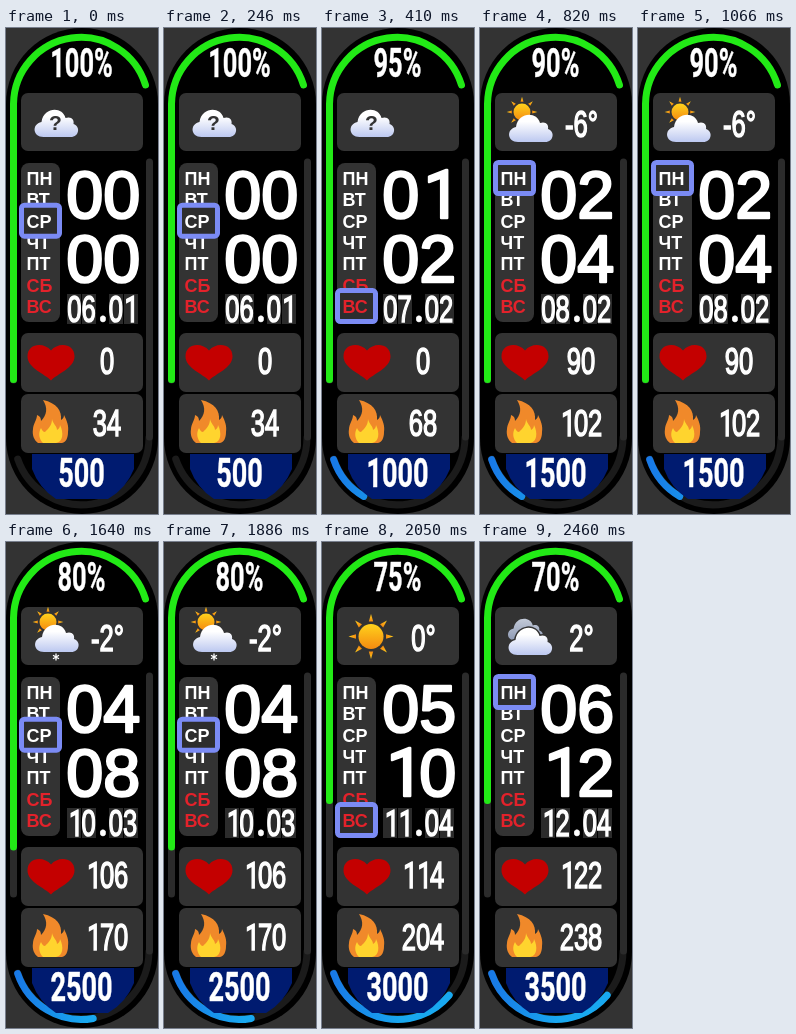
Write an HTML page that moves like this. It is 152 px wide and 486 px high and loops after 2870 ms.

```html
<!DOCTYPE html>
<html lang="ru">
<head>
<meta charset="utf-8">
<title>Watch face</title>
<style>
  html, body { margin: 0; width: 100%; height: 100%; overflow: hidden; background: #333; }
  svg { display: block; width: 152px; height: 486px; }
  text { fill: #fff; text-anchor: middle; }
  .panel { fill: #333; }
  .ring { fill: none; stroke-width: 7; stroke-linecap: round; }
  .din { font: bold 41px Roboto, sans-serif; stroke: #fff; stroke-width: .5; }
  .clock { font: 66.5px "Liberation Sans", sans-serif; stroke: #fff; stroke-width: 2.5; stroke-linejoin: round; }
  .value { font: 36.5px "Liberation Sans", sans-serif; stroke: #fff; stroke-width: 1.6; }
  .one { font-family: Roboto, sans-serif; }
  .day { font: bold 18px "Liberation Sans", sans-serif; text-anchor: start; }
  .weekend { fill: #e3222b; }
</style>
</head>
<body>
<svg viewBox="0 0 152 486">
  <defs>
    <linearGradient id="cloudFill" x2="0" y2="1">
      <stop offset=".25" stop-color="#fff"/><stop offset="1" stop-color="#bcc8f0"/>
    </linearGradient>
    <linearGradient id="greyFill" x2="0" y2="1">
      <stop stop-color="#c3cad8"/><stop offset="1" stop-color="#8d99b4"/>
    </linearGradient>
    <linearGradient id="sunFill" x2="0" y2="1">
      <stop stop-color="#ffd21c"/><stop offset="1" stop-color="#f58a10"/>
    </linearGradient>
    <linearGradient id="goalFill" gradientUnits="userSpaceOnUse" x1="10" x2="80">
      <stop stop-color="#1878e6"/><stop offset="1" stop-color="#18a8f0"/>
    </linearGradient>
    <path id="cloud" d="M9 27C-2 27-3 14 7 12C9-3 28-4 31 8C37 6 40 10 39 14C46 16 45 27 36 27Z"/>
    <g id="sun" fill="url(#sunFill)"><circle r="12.500"/></g>
  </defs>

  <rect width="152" height="486" rx="76"/>
  <path class="ring" stroke="#1b1b1b" d="M143 409.500A67.500 68 0 0 1 11.700 431"/>
  <path class="ring" stroke="#2b2b2b" d="M7.500 352V200M143.500 134V409"/>
  <path class="ring" id="battery" stroke="#22ea16"/>
  <path class="ring" id="goal" stroke="url(#goalFill)"/>

  <g class="panel">
    <rect x="15" y="65" width="122" height="58" rx="7"/>
    <rect x="15" y="135" width="39" height="159" rx="8"/>
    <rect x="15" y="305" width="122" height="59" rx="7"/>
    <rect x="15" y="366" width="122" height="59" rx="7"/>
  </g>
  <path fill="#001b70" d="M26 426H128V441A60 60 0 0 1 102 471H50A60 60 0 0 1 26 441Z"/>
  <path fill="#2b2b2b" d="M61 266h14v30h-14zM76 266h14v30h-14zM103 266h14v30h-14zM118 266h14v30h-14z"/>

  <path fill="#c40000" d="M45 352.500C39 346 21.500 340 21.500 328.500C21.500 315 38 314 45 322.500C52 314 68.500 315 68.500 328.500C68.500 340 51 346 45 352.500Z"/>
  <path fill="#f0892a" d="M37 372C51 375 56 383 55 392C57 391 58 389 58 387C61 393 63 398 62 404C62 410 60 414 56 415H32C28 412 26 407 27 401C27 396 31 392 31 387C34 388 35 390 35 393C41 387 42 380 37 372Z"/>
  <path fill="#ffd42e" d="M46 391C47 396 51 398 51 402C53 401 54 399 54 397C58 405 57 414 50 415H37C33 411 32 405 35 400C36 402 37 404 39 404C43 400 46 397 46 391Z"/>

  <g id="weather"></g>
  <g id="week"></g>
  <rect id="marker" x="15.500" width="38" height="31" rx="3" fill="#2d2d2d" stroke="#7b8bf4" stroke-width="5"/>
  <g id="today"></g>
  <g id="readouts"></g>
</svg>
<script>
const STEP = 410, COUNT = 7;
const DAYS = ["ПН", "ВТ", "СР", "ЧТ", "ПТ", "СБ", "ВС"];
const $ = id => document.getElementById(id);
const two = n => String(n).padStart(2, "0");

const dayY = d => 150.5 + d * 21.35;
const dayText = (name, d) =>
  `<text class="day ${d > 4 ? "weekend" : ""}" x="20.5" y="${dayY(d) + 6.5}">${name}</text>`;

// Fixed-width digit cells; the footless 1 is centred on its ink.
const CELL = .556, ONE_SHIFT = .066;
const digits = text => [...text].map((c, k) => {
  const x = (k - (text.length - 1) / 2) * CELL + (c === "1" ? ONE_SHIFT : 0);
  return `<tspan x="${x}em" ${c === "1" ? 'class="one"' : ""}>${c}</tspan>`;
}).join("");

// Every readout is centred on x and shares one condensing factor per face.
function label(cls, x, y, condense = 1, format = text => text) {
  const el = document.createElementNS("http://www.w3.org/2000/svg", "text");
  el.setAttribute("class", cls);
  el.setAttribute("transform", `translate(${x} ${y}) scale(${condense} 1)`);
  $("readouts").append(el);
  return text => { el.innerHTML = format(String(text)); };
}
const clock = y => label("clock", 97.3, y, 1, digits);
const value = (x, y) => label("value", x, y, .7, digits);
const show = {
  battery: label("din", 75.5, 49, .62),
  steps: label("din", 75.5, 459, .66),
  hour: clock(190.3),
  minute: clock(254.3),
  date: value(75.5, 294),
  month: value(117, 294),
  dot: label("din", 97, 294, .85),
  heart: value(101, 346),
  energy: value(101, 408),
  degrees: label("value", 101.5, 108.5, .7),
};
show.dot(".");

$("week").innerHTML = DAYS.map(dayText).join("");
$("sun").innerHTML += Array.from({ length: 8 }, (_, k) =>
  `<path d="M-2.2-15L0-22.5L2.2-15Z" transform="rotate(${k * 45})"/>`).join("");

const cloud = (x, y, scale = 1, paint = 'fill="url(#cloudFill)"') =>
  `<use href="#cloud" ${paint} transform="translate(${x} ${y}) scale(${scale})"/>`;
const sun = (x, y, scale = 1) => `<use href="#sun" transform="translate(${x} ${y}) scale(${scale})"/>`;
const drop = (x, y) => `<path fill="#58a6f5" d="M${x} ${y}q5 8 0 8q-5 0 0-8"/>`;
const flake = `<path stroke="#fff" stroke-width="1.3" d="M50 111.5v7M47 113.2l6 3.5M53 113.2l-6 3.5"/>`;
const unknown = cloud(28.5, 82) +
  `<text x="49.5" y="102" style="font:bold 21px 'Liberation Sans',sans-serif;fill:#333">?</text>`;
const partly = y => sun(42, y, .68) + cloud(29, y + 3);
const WEATHER = [
  unknown, unknown, partly(84),
  partly(80) + drop(41, 107) + drop(50, 110) + drop(59, 107),
  partly(80) + flake,
  sun(49, 94.5),
  cloud(28, 77, .8, 'fill="url(#greyFill)"') +
    cloud(28.5, 86, 1, 'fill="url(#cloudFill)" stroke="#333" stroke-width="3" paint-order="stroke"'),
];

function goalArc(level) {
  if (!level) return "";
  const point = deg => {
    const a = deg * Math.PI / 180;
    return `${75.5 + 67.5 * Math.cos(a)} ${409.5 + 68 * Math.sin(a)}`;
  };
  return `M${point(161)}A67.5 68 0 0 0 ${point(160 - 40 * level)}`;
}

function draw(i) {
  const charge = 100 - 5 * i, steps = 500 * (i + 1), day = [2, 6, 0, 1][i % 4];
  show.battery(charge + "%");
  show.steps(steps);
  show.hour(two(i));
  show.minute(two(2 * i));
  show.date(two(6 + i));
  show.month(two(1 + Math.ceil(i / 2)));
  show.heart(i < 2 ? 0 : 74 + 8 * i);
  show.energy(34 * (i + 1));
  show.degrees(i < 2 ? "" : 2 * i - 10 + "°");
  $("weather").innerHTML = WEATHER[i];

  const level = Math.min(9, Math.floor(charge / 10));
  $("battery").setAttribute("d", `M7.5 ${351.5 - 46.5 * (9 - level)}V76A67.5 67.5 0 0 1 139.5 57`);
  $("goal").setAttribute("d", goalArc(Math.floor(steps / 1000)));

  $("marker").setAttribute("y", dayY(day) - 16);
  $("today").innerHTML = dayText(DAYS[day], day);
}

let shown = -1;
function tick() {
  const i = Math.floor(performance.now() / STEP) % COUNT;
  if (i !== shown) draw(shown = i);
  requestAnimationFrame(tick);
}
tick();
</script>
</body>
</html>
```
